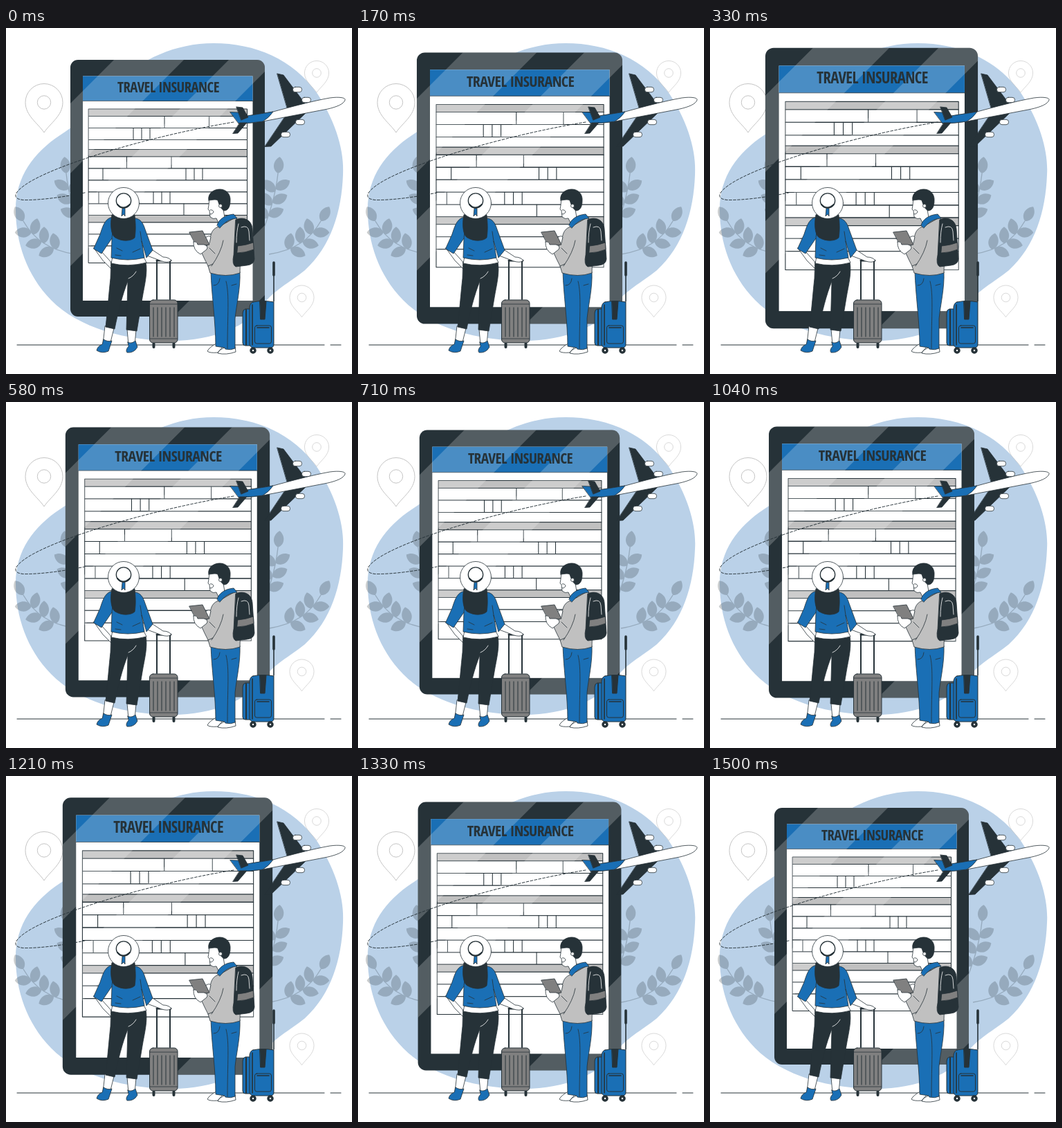
Animation of 500x500 px, one loop 1.54 s. Source, as an HTML page:

```html
<!DOCTYPE html>
<html lang="en">
<head>
<meta charset="utf-8">
<title>Travel insurance</title>
<style>
html, body { margin: 0; width: 100%; height: 100%; overflow: hidden; background: #fff; }
svg { display: block; width: 100vw; height: 100vh; }
.ink { fill: none; stroke: #263238; stroke-width: 1; stroke-linecap: round; stroke-linejoin: round; }
.fine { stroke-width: .8; }
.white { fill: #fff; }
.blue { fill: #1a6fb5; }
.dark { fill: #263238; }
.gray { fill: #c0c0c0; }
.mid { fill: #808080; }
.pin { fill: none; stroke: #c4c4c4; }
.pin * { vector-effect: non-scaling-stroke; }
#title {
  font-family: "Noto Sans ExtraCondensed", "Open Sans Condensed", "Roboto Condensed", Roboto, "Open Sans", sans-serif;
  font-stretch: 75%; font-weight: 700; letter-spacing: -.025em; fill: #263238; text-anchor: middle;
}
</style>
</head>
<body>
<svg viewBox="0 0 500 500">
  <defs>
    <clipPath id="case"><rect x="93" y="46" width="281" height="371" rx="11"/></clipPath>
    <path id="leaf" d="M0 0C-10 -5 -9 -18 0 -24C9 -18 10 -5 0 0Z"/>
    <g id="pin">
      <path d="M0 43.500C-9 30 -27 19 -27 0A27 27 0 0 1 27 0C27 19 9 30 0 43.500Z"/>
      <circle r="9.700"/>
    </g>
  </defs>

  <path fill="#bad1e8" d="M300 22C360 22 415 45 450 95C478 138 489 180 487 212C485 265 470 315 432 350C410 368 385 380 372 400C350 430 300 452 240 452C175 452 105 434 65 393C30 357 14 310 14 262C14 215 40 180 78 155C120 128 135 105 160 80C195 45 245 22 300 22Z"/>
  <g id="plant" class="dark" stroke="#263238" opacity=".24"></g>
  <use href="#plant" transform="translate(480 0) scale(-1 1)"/>
  <g class="pin">
    <use href="#pin" transform="translate(55 107.500)"/>
    <use href="#pin" transform="translate(449 65) scale(.65)"/>
    <use href="#pin" transform="translate(427.500 389.500) scale(.65)"/>
  </g>
  <path class="ink" d="M16 458H460M469 458H484"/>

  <g id="tablet">
    <rect class="dark" x="93" y="46" width="281" height="371" rx="11"/>
    <rect class="white" x="111" y="69.500" width="245.500" height="324.500"/>
    <rect class="blue" x="111" y="69.500" width="245.500" height="36"/>
    <path class="ink fine" d="M111 105.500H356.500"/>
    <g id="form" class="ink"></g>
    <g id="glare" clip-path="url(#case)" fill="#fff" opacity=".21"></g>
    <text id="title" x="234.500" y="93">TRAVEL INSURANCE</text>
  </g>

  <path class="ink" stroke-dasharray="3.500 2.500" d="M329 136C230 152 90 190 35 222C10 237 8 247 25 248.500C50 249 85 244 114 238"/>

  <!-- plane -->
  <g class="ink fine">
    <path class="dark" d="M374 171.500L383 171L433 123L403 128.500ZM392 66L401 68L435 113L408 121Z"/>
    <g id="engines" class="white"></g>
    <path class="white" d="M336 137.500L350 127L386 121C412 114 445 105 468 101C483 99 491 101 490 104C488 110 478 114 465 117L371 135C358 137 345 138 336 137.500Z"/>
    <path class="blue" d="M324 121.500L335 122L348 127L386 121Q380 130 371 135Q352 138 336 137.500Z"/>
    <path class="dark" d="M333 114L342 115L350 129L340 133ZM328 152.500L335 152L348 137L338 137Z"/>
  </g>

  <!-- grey case -->
  <g class="ink">
    <path stroke-width="2" d="M218 392V337M237 392V337"/>
    <path stroke-width="3" d="M218 336H238"/>
    <path stroke-width="4" d="M213.500 456V461M242.500 456V461"/>
    <rect class="mid" x="207.500" y="393" width="40.500" height="62" rx="5"/>
    <path class="fine" d="M208 399H247.500M208 449H247.500"/>
    <g id="slats"></g>
  </g>

  <!-- woman -->
  <g class="ink fine">
    <path class="white" d="M143 431L140 457L150 458L156 434ZM175 435L177 458L186 458L188 436Z"/>
    <path class="blue" d="M141 450Q147 454 153 452L148 467Q139 471 131 466Q132 460 139 457ZM176 454Q181 457 187 452L190 461Q185 470 175 469Q172 466 177 460Z"/>
    <path class="white" d="M127 318L140 336L152 348L154 341L147 333L137 322ZM204 329L220 335Q229 339 235 338L239 336Q235 331 227 331L212 321Z"/>
    <path class="dark" d="M152 338L202 338C205 354 200 372 197 390L189 438L174 436L176 366C168 386 162 410 157 435L144 432C147 405 149 380 151 362Z"/>
    <path stroke="#fff" d="M177 362Q184 359 188 352"/>
    <path class="white" d="M154 331L152 340Q176 346 203 339L199 331Z"/>
    <path class="blue" d="M151 274C142 277 139 289 136 298L126.500 319L138 326L153 304L152 332Q176 338 200 332L196 308L203 332L212 321L201 291C198 281 194 276 187 275Z"/>
    <path d="M153 304L154 294M196 308L194 294M160 318L168 322M183 324L194 319M158 328L166 329"/>
    <path class="dark" d="M153 270C150 284 152 300 158 303C168 309 181 308 186 303C188 291 187 280 186 270Z"/>
    <circle class="white" cx="170" cy="253" r="22.500"/>
    <circle class="white" cx="170" cy="249.500" r="10.700" stroke-width="1.300"/>
    <path stroke-width="2" d="M161 255Q169 264 179 255"/>
    <path class="blue" d="M168 261L167 272L170 269L172 272L172 261Z"/>
  </g>

  <!-- man -->
  <g class="ink fine">
    <path class="white" d="M304 456Q294 461 291 467Q294 470 306 469L313 461ZM318 461Q307 465 306 470Q318 473 332 468L331 460Z"/>
    <path class="blue" d="M296 352Q318 358 338 352C339 376 333 400 331 420L331 463Q325 466 317 464L316 462L303 460C303 425 297 385 296 352Z"/>
    <path d="M318 366C323 385 320 415 320 463M309 362Q308 372 300 372M326 372L333 370"/>
    <path class="white" d="M294 245L293 256L292 262L294 264L295 273Q299 277 304 275L308 284L316 274L312 250Z"/>
    <path class="dark" d="M293 249C291 240 299 233 309 233C319 233 325 241 324 250C324 258 321 264 315 264C311 262 308 256 306 249C302 247 297 249 293 249Z"/>
    <circle class="white" cx="310" cy="257" r="2.500"/>
    <path d="M295 263Q299 262 300 266Q298 270 295 269"/>
    <path class="gray" d="M308 287C299 289 296 296 295 305L288 320L281 321L287 334L292 344L295 354Q318 361 338 354L340 283L332 274Z"/>
    <path d="M314 307Q311 324 297 344M294 318L302 326M292 344L299 341"/>
    <path class="blue" d="M305 285C307 277 316 270 329 269L334 275C322 276 316 281 309 289Z"/>
    <path class="white" d="M288 303Q293 299 296 302L294 311L288 314Z"/>
    <path class="mid" d="M265 295L284 293L294 313L276 316Z"/>
    <path class="white" d="M271 309Q276 308 277 313L286 313Q293 315 290 320L281 327Q270 321 271 309Z"/>
    <path class="dark" d="M332 277C343 272 355 277 356 290L359 334Q358 342 348 343L332 345Q326 342 329 328Z"/>
    <path class="mid" d="M335 315Q347 314 357.500 310L358 320Q346 325 334 325Z"/>
    <path stroke="#fff" d="M336 283Q333 294 333 310M340 288Q350 284 351 294L352 307"/>
  </g>

  <!-- blue case -->
  <g class="ink">
    <path d="M387 395V340" stroke-width="1.600"/>
    <path d="M387 339V357" stroke-width="3.600"/>
    <path class="blue" d="M358 406H346Q342 407 342 412V455Q342 459 346 459H358Z"/>
    <path d="M347 407V458" stroke-width="2"/>
    <path class="blue" d="M357 396Q371 393 387 396V457Q387 462 382 462H357Q352 461 352 456V403Q353 397 357 396Z"/>
    <path class="dark" d="M367 395H376L374 421H368Z"/>
    <rect class="blue" x="359.500" y="430" width="24" height="26" rx="3"/>
    <path d="M363 433H380M356 400V458" stroke-width="1.600"/>
    <g id="wheels" class="white" stroke-width="3.500"></g>
  </g>
</svg>
<script>
const $ = id => document.getElementById(id);

function add(parent, name, attrs) {
  const el = document.createElementNS('http://www.w3.org/2000/svg', name);
  for (const key in attrs) el.setAttribute(key, attrs[key]);
  parent.append(el);
  return el;
}

// A stem with a leaf at its tip and pairs of leaves along it
function branch(d, pairs, first) {
  const stem = add($('plant'), 'path', { d, fill: 'none', 'stroke-width': 1.4 });
  const len = stem.getTotalLength();
  const leaf = (at, turn) => {
    const p = stem.getPointAtLength(at), q = stem.getPointAtLength(at - 1);
    const angle = Math.atan2(p.y - q.y, p.x - q.x) * 180 / Math.PI + 90 + turn;
    add($('plant'), 'use', {
      href: '#leaf', 'stroke-width': 0, transform: `translate(${p.x} ${p.y}) rotate(${angle})`
    });
  };
  leaf(len, 0);
  for (let i = 0; i < pairs; i++) {
    const at = len * first - i * 20;
    leaf(at, -48);
    leaf(at - 4, 58);
  }
}

// Each section is a grey heading and rows of equal height; the last row fills the rest
function section(top, bottom, rows) {
  const left = 119.5, right = 348.5, head = 10.5, step = 17;
  const row = (y, end, fill) =>
    add($('form'), 'rect', { x: left, y, width: right - left, height: end - y, class: fill });
  row(top, top + head, 'gray');
  rows.forEach((cols, i) => {
    const y = top + head + i * step;
    const end = i < rows.length - 1 ? y + step : bottom;
    row(y, end, 'white');
    cols.forEach(x => add($('form'), 'path', { d: `M${x} ${y}V${end}` }));
  });
}

// Diagonal light between two lines x + y = from and x + y = to
function glare(from, to) {
  add($('glare'), 'path', { d: `M${from} 0H${to}L${to - 500} 500H${from - 500}Z` });
}

const trio = x => [x, x + 12, x + 24];

branch('M100 327C62 321 40 305 25 279', 3, 0.78);
branch('M116 310C100 274 90 240 87 210', 3, 0.78);

section(117, 175.5, [[229, 293.5], trio(184), []]);
section(175.5, 270.5, [[174.5, 239], [140, ...trio(260)], [], [134, ...trio(213)], [257]]);
section(270.5, 339.5, [[], [], []]);

glare(202, 303);
glare(368, 437);
glare(659, 760);

for (const [x, y] of [[421, 89], [434, 104], [404, 154], [425, 136]]) {
  add($('engines'), 'rect', { x: x - 6.5, y: y - 3.7, width: 13, height: 7.4, rx: 3.5 });
}
for (let x = 213; x < 244; x += 6) add($('slats'), 'path', { d: `M${x} 404V446` });
for (const cx of [357, 382]) add($('wheels'), 'circle', { cx, cy: 466, r: 3 });

// Largest title size that fits the header
const title = $('title'), maxSize = 21.8;
title.setAttribute('font-size', maxSize);
title.setAttribute('font-size', maxSize * Math.min(1, 147 / title.getComputedTextLength()));

// Two beats, as start, peak and end in steps of the 37-step loop
const LOOP = 1540, STEPS = 37;
const beats = [[0, 7, 21.25], [22.1, 27.2, 36]];

function beat(n) {
  for (const [start, peak, end] of beats) {
    if (n > start && n < end) return n < peak ? (n - start) / (peak - start) : (end - n) / (end - peak);
  }
  return 0;
}

function draw(ms) {
  const step = Math.floor((ms % LOOP) * STEPS / LOOP + 0.15) % STEPS;
  const s = 1 + 0.1 * beat(step);
  $('tablet').setAttribute('transform', `translate(233.5 231.5) scale(${s}) translate(-233.5 -231.5)`);
}

const t0 = performance.now();
function tick() {
  draw(performance.now() - t0);
  requestAnimationFrame(tick);
}
tick();
</script>
</body>
</html>
```
